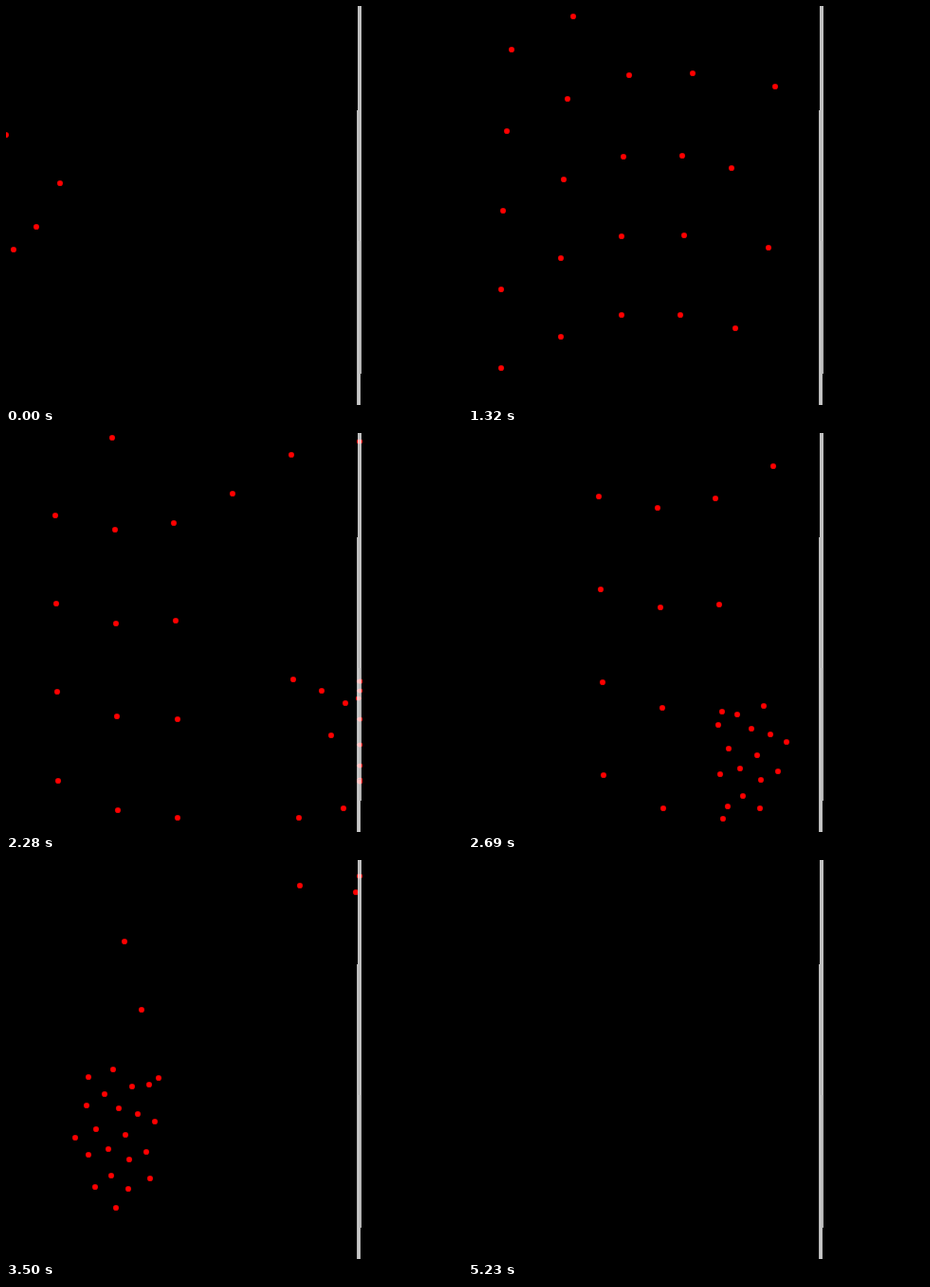
Recreate the animation shown at these times as an HTML page with a canvas. Size 481x421 px, loop 5280 ms.

```html
<!DOCTYPE html>
<html lang="en">
<head>
<meta charset="utf-8">
<title>Flock and wall</title>
<style>
  html, body { margin: 0; width: 100%; height: 100%; overflow: hidden; background: #000; }
  canvas { display: block; width: 481px; height: 421px; }
</style>
</head>
<body>
<canvas id="stage" width="481" height="421"></canvas>
<script>
const ctx = document.getElementById('stage').getContext('2d');
const LOOP = 5280, CLEAR = 5230, STEP = 50.75, LAST = 87;
const WALL = 373, SPEED = 11, GOLDEN = 2.4;
const MID = 36, MEET = 53, HOME = 69; // steps at which birds turn and gather
const BATCHES = 8, LANES = 5, EARLY = 5;

const line = (x, y, vx, vy, t0) => t => [x + vx * (t - t0), y + vy * (t - t0)];

// Birds enter in batches, fanned out over lanes whose middle sways up and down.
function entry(batch, lane) {
  const lead = Math.exp(-2 * batch), off = lane - 2.5;
  const zig = (lane % 2 ? 20 : -20) * lead;
  const x = 397 - 63 * batch + 10 * lead + zig;
  const y = 225 - 43 * Math.cos((batch - 1.5) * Math.PI / 4) + (109 - 3 * batch) * off;
  const slope = -0.15 + 0.11 * lead + (0.23 - 0.025 * batch) * off;
  const vx = SPEED / Math.hypot(1, slope);
  return line(x, y, vx, vx * slope, MID);
}

// The returning flock is a spiral of evenly packed places.
function flockPlace(k) {
  const r = 13.5 * Math.sqrt(k + 0.5), a = k * GOLDEN;
  return line(118 + 0.8 * r * Math.cos(a), 290 + 1.3 * r * Math.sin(a), -11.2, -3.1, HOME);
}

// Stragglers follow above it, each heading a little steeper than the one below.
function straggler(j) {
  return line(125 + 18 * j, 86 + 72 * j, -4.9 - 1.9 * j, -11.8 + 3 * j, HOME);
}

function turn(inbound, outbound, from, to) {
  return t => {
    const s = Math.min(1, Math.max(0, (t - from) / (to - from)));
    const w = s * s * (3 - 2 * s), a = inbound(t), b = outbound(t);
    return a.map((v, i) => v + (b[i] - v) * w);
  };
}

const birds = [];
let places = 0;
for (let batch = 0; batch < BATCHES; batch++) {
  for (let lane = 0; lane < LANES; lane++) {
    const inbound = entry(batch, lane), early = batch < EARLY;
    if (lane < 2) { // the top lanes fly out over the edge
      if (batch || lane) birds.push(inbound);
      continue;
    }
    const outbound = !early && lane === 2
      ? straggler(BATCHES - 1 - batch)
      : flockPlace(places++);
    birds.push(turn(inbound, outbound, early ? MID : MEET, early ? MEET : HOME));
  }
}

function disc(x, y, r, color) {
  ctx.fillStyle = color;
  ctx.beginPath();
  ctx.arc(x, y, r, 0, 2 * Math.PI);
  ctx.fill();
}

function bar(x, y, w, h, color) {
  ctx.fillStyle = color;
  ctx.fillRect(x, y, w, h);
}

function drawWall() {
  ctx.globalCompositeOperation = 'lighten'; // birds shine through in pink
  bar(371, 0, 4, 110, '#b4b4b4');
  bar(370, 110, 5, 278, '#b4b4b4');
  bar(370, 388, 4, 33, '#b4b4b4');
  bar(371, 0, 1, 248, '#c8c8c8');
  bar(373, 0, 1, 248, '#c8c8c8');
  bar(371, 248, 2, 173, '#c8c8c8');
  ctx.globalCompositeOperation = 'source-over';
}

function draw(time) {
  bar(0, 0, 481, 421, '#000');
  if (time < CLEAR) {
    const step = Math.min(LAST, Math.floor((time + 5) / STEP));
    for (const bird of birds) {
      const [px, py] = bird(step);
      const x = Math.round(Math.min(px, WALL)), y = Math.round(py);
      disc(x, y, 3.1, '#d80000');
      disc(x, y, 2.3, '#ff0000');
    }
  }
  drawWall();
}

const born = performance.now();
function tick() {
  draw((performance.now() - born) % LOOP);
  requestAnimationFrame(tick);
}
tick();
</script>
</body>
</html>
```
